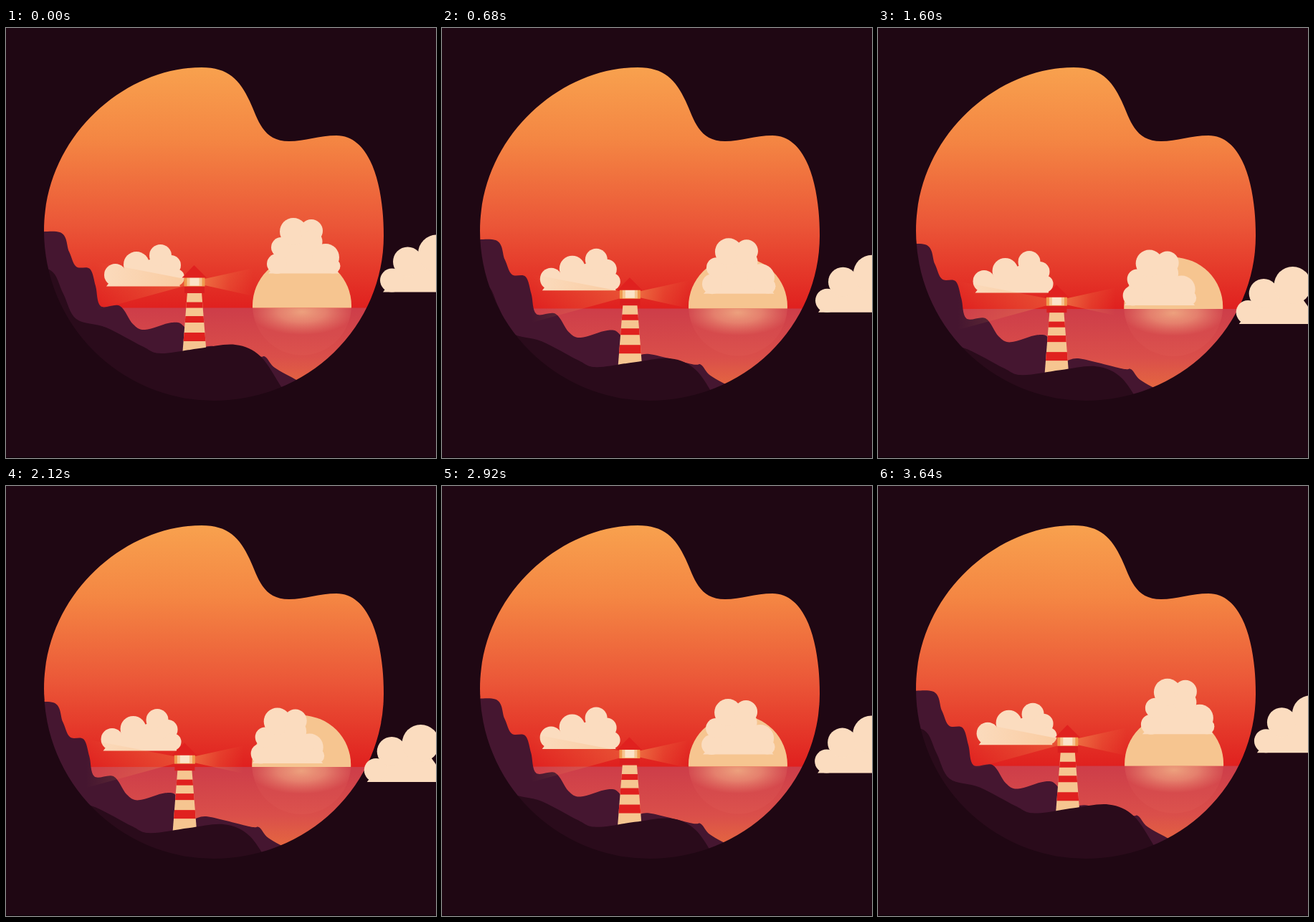
An HTML page for the animation above (3680 ms loop, 600 by 600 pixels).

```html
<!DOCTYPE html>
<html lang="en">
<head>
<meta charset="utf-8">
<title>Lighthouse at dusk</title>
<style>
  html, body { margin: 0; width: 100%; height: 100%; overflow: hidden; background: #1f0713; }
  svg { display: block; width: 100vw; height: 100vh; }
  .cloud { fill: #fbdcbf; }
  .sand { fill: #f6c590; }
  .red { fill: #e0211f; }
</style>
</head>
<body>
<svg viewBox="0 0 600 600">
  <defs>
    <linearGradient id="sky" gradientUnits="userSpaceOnUse" x1="0" y1="55" x2="0" y2="390">
      <stop offset="0" stop-color="#f8a14e"/>
      <stop offset=".3" stop-color="#f48643"/>
      <stop offset=".65" stop-color="#eb5738"/>
      <stop offset="1" stop-color="#e0211f"/>
    </linearGradient>
    <linearGradient id="sea" gradientUnits="userSpaceOnUse" x1="0" y1="390" x2="0" y2="505">
      <stop offset="0" stop-color="#cd3d49"/>
      <stop offset=".6" stop-color="#da4f4a"/>
      <stop offset="1" stop-color="#e5693f"/>
    </linearGradient>
    <radialGradient id="glow" gradientUnits="userSpaceOnUse" cx="0" cy="0" r="1"
      gradientTransform="translate(413 396) scale(74 32)">
      <stop offset="0" stop-color="#f6c08e" stop-opacity=".75"/>
      <stop offset=".45" stop-color="#f4b088" stop-opacity=".55"/>
      <stop offset="1" stop-color="#f0a080" stop-opacity="0"/>
    </radialGradient>
    <linearGradient id="beamL" gradientUnits="userSpaceOnUse" x1="249" y1="0" x2="125" y2="0">
      <stop offset="0" stop-color="#f6a55a" stop-opacity=".3"/>
      <stop offset="1" stop-color="#f6a55a" stop-opacity="0"/>
    </linearGradient>
    <linearGradient id="beamR" gradientUnits="userSpaceOnUse" x1="277" y1="0" x2="345" y2="0">
      <stop offset="0" stop-color="#f6a55a" stop-opacity=".5"/>
      <stop offset=".5" stop-color="#f6a55a" stop-opacity=".18"/>
      <stop offset="1" stop-color="#f6a55a" stop-opacity="0"/>
    </linearGradient>
    <clipPath id="above"><rect x="300" y="300" width="240" height="90.5"/></clipPath>
    <clipPath id="below"><rect x="300" y="390.5" width="240" height="90"/></clipPath>
    <clipPath id="tower"><path d="M253 369H273L281 470H245Z"/></clipPath>
  </defs>

  <rect x="40" y="40" width="500" height="490" fill="url(#sky)"/>
  <g data-depth=".035">
    <rect x="40" y="390.5" width="500" height="140" fill="url(#sea)"/>
    <circle cx="413" cy="387.5" r="69" class="sand" clip-path="url(#above)"/>
    <g clip-path="url(#below)">
      <circle cx="413" cy="387.5" r="69" fill="#f08070" opacity=".08"/>
      <circle cx="413" cy="387.5" r="69" fill="url(#glow)"/>
    </g>
  </g>
  <g id="far" class="cloud" data-depth=".2"></g>
  <g id="mid" class="cloud" data-depth="1"></g>
  <path id="back" data-depth=".39" fill="#451630"/>
  <g data-depth=".61">
    <path d="M249 350L125 326V394L249 360Z" fill="url(#beamL)"/>
    <path d="M277 350L345 335V374L277 359Z" fill="url(#beamR)"/>
    <g id="bands" class="red" clip-path="url(#tower)">
      <rect x="240" y="369" width="45" height="102" class="sand"/>
    </g>
    <rect x="249" y="360" width="28" height="10" fill="#da1f1f"/>
    <rect x="248.5" y="347.5" width="29" height="13" fill="#f09a4e"/>
    <rect x="252.500" y="347.5" width="21" height="12.500" class="sand"/>
    <rect x="256.500" y="348" width="13" height="11.500" fill="#fbe3c8"/>
    <path d="M262.500 331L280 348.500H245.500Z" class="red"/>
  </g>
  <path id="front" data-depth=".68" fill="#2a0b1b"/>

  <path fill="#1f0713" fill-rule="evenodd" d="M0 0H600V600H0Z
    M53 283C53 152 165 55 273 55C310 55 326 72 340 102C352 128 358 158 395 158
    C417 158 437 150 461 150C508 150 527 218 527 290A237 230 0 0 1 290 520A237 237 0 0 1 53 283Z"/>
  <g id="near" class="cloud" data-depth="1"></g>
  <rect y="599" width="600" height="1" fill="#0a0206"/>
</svg>
<script>
const LOOP = 3680;
const byId = id => document.getElementById(id);

function add(parent, tag, attrs) {
  const el = document.createElementNS('http://www.w3.org/2000/svg', tag);
  for (const name in attrs) el.setAttribute(name, attrs[name]);
  parent.append(el);
}

// Round puffs [x, y, r] joined to a flat foot.
function cloud(id, foot, from, to, puffs) {
  const g = byId(id);
  const centres = puffs.map(([x, y]) => [x, y]);
  add(g, 'path', { d: `M${from} ${foot}L${centres.join('L')}L${to} ${foot}Z` });
  for (const [cx, cy, r] of puffs) add(g, 'circle', { cx, cy, r });
}

// Smooth ridge through key points, closed below the stage.
function ridge(id, points) {
  const at = i => points[Math.max(0, Math.min(points.length - 1, i))];
  const handle = (p, a, b) => [0, 1].map(k => p[k] + (b[k] - a[k]) / 6);
  let d = `M${points[0]}`;
  for (let i = 1; i < points.length; i++) {
    const p = at(i - 1), q = at(i);
    d += `C${handle(p, at(i - 2), q)} ${handle(q, at(i + 1), p)} ${q}`;
  }
  byId(id).setAttribute('d', d + 'V640H20Z');
}

cloud('far', 360.5, 140, 243,
  [[152.5, 344.5, 15.5], [182, 330, 18], [215.5, 317.5, 15.5], [230, 331, 14], [237, 348, 12]]);
cloud('mid', 342.5, 366, 464.5,
  [[378, 329, 14], [384, 306, 14], [401, 284, 19], [426, 283, 16], [426, 298, 15.5],
   [446, 320, 19], [456, 332, 10.5]]);
cloud('near', 368.5, 526, 640, [[538.5, 352, 16.5], [560.5, 326, 20.5], [601, 314.5, 26]]);

ridge('back', [[20, 288], [75, 285], [88, 312], [98, 333], [117, 336], [125, 360], [132, 388],
  [159, 388], [177, 413], [194, 421], [231, 411], [248, 416], [266, 446], [290, 444],
  [349, 458], [362, 459], [375, 474], [407, 492], [440, 512]]);
ridge('front', [[20, 335], [62, 338], [80, 371], [98, 406], [140, 418], [190, 444],
  [216, 454], [270, 447], [320, 442], [355, 458], [385, 502], [402, 526]]);

// Stripes widen towards the foot of the tower.
for (let i = 0; i < 3; i++) {
  add(byId('bands'), 'rect',
    { x: 240, y: 382.5 + 19.5 * i + 1.75 * i * (i - 1), width: 45, height: 8 + i * i });
}

// The view sinks, lingers while swaying left, then rises again.
function view(t) {
  const u = t / 1860 - 1, a = Math.abs(u);
  const away = Math.max(0, (a - .25) / .75);
  return [
    3.6 * Math.max(0, u) ** 5 - 24 * Math.exp(-((a / .4) ** 2.5)),
    44.5 * (1 - away ** 1.5)
  ];
}

const layers = [...document.querySelectorAll('[data-depth]')];
const start = performance.now();

function draw(now) {
  const [x, y] = view(Math.max(0, now - start) % LOOP);
  for (const el of layers) {
    const d = +el.dataset.depth;
    el.setAttribute('transform', `translate(${(x * d).toFixed(2)} ${(y * d).toFixed(2)})`);
  }
  requestAnimationFrame(draw);
}
draw(start);
</script>
</body>
</html>
```
